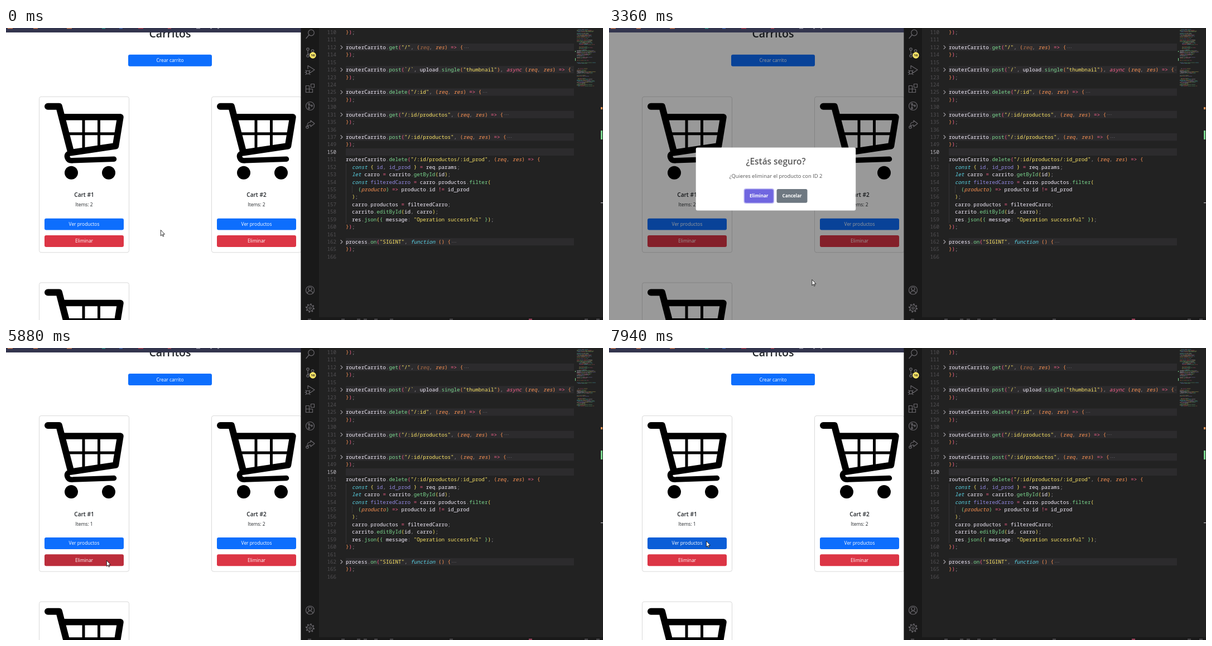
An HTML page for the animation above (8 s loop, 1070 px wide and 524 px high).

```html
<!DOCTYPE html>
<html lang="es">
<head>
<meta charset="utf-8">
<title>Carritos</title>
<style>
html, body { margin: 0; height: 100%; overflow: hidden; background: #222; }
svg { display: block; width: 100vw; height: 100vh; font-family: "Open Sans", "Noto Sans", sans-serif; }
text { white-space: pre; }
.mono { font-family: "Noto Sans Mono", "DejaVu Sans Mono", monospace; font-size: 9.23px; font-weight: 500; }
.icon { fill: none; stroke: #69676c; stroke-width: 1.2; stroke-linejoin: round; stroke-linecap: round; }
.loading .pic { display: none; }
.loading .body, .loading .lower { transform: translateY(-142px); }
.loading .frame { height: 138px; }
</style>
</head>
<body>
<svg id="stage" viewBox="0 0 1070 524" preserveAspectRatio="none"></svg>
<script>
const PINK = '#fc618d', ORANGE = '#fd9353', YELLOW = '#fce566', GREEN = '#7bd88f',
      BLUE = '#5ad4e6', PURPLE = '#948ae3', WHITE = '#f7f1ff', GRAY = '#8b888f';
const BRACKETS = [PINK, ORANGE, YELLOW, GREEN, BLUE, PURPLE];

const rect = (x, y, w, h, fill, extra = '') =>
  `<rect x="${x}" y="${y}" width="${w}" height="${h}" fill="${fill}" ${extra}/>`;
const label = (x, y, size, str, fill, weight = 400, extra = '') =>
  `<text x="${x}" y="${y + size * 0.36}" font-size="${size}" fill="${fill}" font-weight="${weight}" text-anchor="middle" ${extra}>${str}</text>`;
const button = (x, y, w, h, fill, str, size = 8.4, weight = 400, extra = '') =>
  rect(x, y, w, h, fill, `rx="3" ${extra}`) + label(x + w / 2, y + h / 2, size, str, '#fff', weight);

// ---- Shop page ----
const cartIcon = `<g class="pic" fill="none" stroke="#000" stroke-linecap="round" stroke-linejoin="round">
  <path d="M16 18H36L57 99" stroke-width="12"/>
  <path d="M42 37H146L137.500 89 57 101" stroke-width="11.500"/>
  <path d="M56 101Q49 104 51 110 53 116 61 115L134.500 112.500" stroke-width="9.500"/>
  <path d="M80 38V96M107.500 38V94M47 67H140" stroke-width="5"/>
  <g fill="#000" stroke="none"><circle cx="58" cy="137" r="12"/><circle cx="125" cy="137" r="12"/></g></g>`;

const card = (x, y, n, cls = '') => `<g transform="translate(${x} ${y})"><g class="${cls}">
  <rect class="frame" x=".5" y=".5" width="161" height="279.500" rx="3.500" fill="#fff" stroke="#d9d9d9"/>
  ${cartIcon}<g class="body">
  ${label(81, 177, 10.1, 'Cart #' + n, '#212529', 600)}
  ${label(81, 194.5, 8.4, 'Items: 2', '#212529', 400, `id="items${n}"`)}
  ${button(10, 218.9, 142, 20.9, '#0d6efd', 'Ver productos', 8.4, 400, `id="view${n}"`)}
  ${button(10, 249.2, 142, 20.9, '#dc3545', 'Eliminar', 8.4, 400, `id="remove${n}"`)}
  </g></g></g>`;

const bookmarks = [[3, 9, ORANGE], [49, 8, ORANGE], [109, 9, ORANGE], [172, 6, '#2fb59a'], [203, 6, '#4d7fd6'],
  [237, 9, '#d33b4a'], [290, 6, '#e0525c'], [341, 7, '#b9bac8'], [366, 3, '#b9bac8'], [379, 3, '#b9bac8']]
  .map(([x, w, c]) => rect(x, 0, w, 1.3, c, 'opacity=".8"')).join('');

const page = `<g id="page">
  ${label(294, 10, 19.5, 'Carritos', '#212529', 600)}
  ${button(219, 47.8, 150, 20.9, '#0d6efd', 'Crear carrito')}
  ${card(59, 122.8, 1)}${card(368, 122.8, 2)}${card(59, 456.5, 3, 'lower')}</g>`;

// ---- Dialogs, laid out around their shared centre (299, 271) ----
const columns = [139.5, 203, 267, 330.5, 394.5, 458];
const cells = [139, 201.5, 264.5, 327.5, 390];
const cross = (x, y) => [['#000', 6.4], ['#fff', 3.6]].map(([c, w]) =>
  `<path d="M${x - 6.7} ${y - 6.7}l13.400 13.400m0-13.400l-13.400 13.400" stroke="${c}" stroke-width="${w}" stroke-linecap="round"/>`).join('');
const productRow = (y, values) => rect(103, y, 391, 31.5, '#f8f9fa') +
  values.map((v, i) => label(cells[i], y + 12, 9.5, v, '#545454')).join('') + cross(455.5, y + 16);
const ringed = (x, y, w, h, str) =>
  rect(x - 1.6, y - 1.6, w + 3.2, h + 3.2, '#b8b3f0', 'rx="4"') + button(x, y, w, h, '#7066e0', str, 8, 700);

const dialogs = `
  <g id="products">${rect(87, 165, 424, 212, '#fff', 'rx="3"')}
    <path d="M493.500 176.500l7.500 7.500m0-7.500l-7.500 7.500" stroke="#bbb" stroke-width="1.700"/>
    ${label(299, 189, 15.4, 'Productos', '#595959', 600)}
    ${rect(103, 213, 391, 32, '#f8f9fa')}
    ${['Nombre', 'Código', 'Precio', 'Cantidad', 'ID', 'Eliminar'].map((s, i) => label(columns[i], 225, 9.4, s, '#545454', 700)).join('')}
    ${productRow(249, ['Aceite', 'AcNa1', 500, 15, 2])}${productRow(284.5, ['Leche', 'LeSe1', 200, 10, 1])}
    ${ringed(277, 338.7, 44, 24, 'Cerrar')}</g>
  <g id="confirm">${rect(155.7, 214.5, 286.5, 113, '#fff', 'rx="3"')}
    ${label(299, 239, 15.4, '¿Estás seguro?', '#595959', 600)}
    ${label(299, 265.3, 9.4, '', '#545454', 400, 'id="question"')}
    ${ringed(243, 289.5, 51.5, 24, 'Eliminar')}
    ${button(300.5, 289, 55, 24.8, '#6e7881', 'Cancelar', 8, 700)}</g>`;

// ---- Code editor ----
const code = `110|});
111|
112|>routerCarrito.get("/", (req, res) => {
114|});
115|
116|>routerCarrito.post(\`/\`, upload.single("thumbnail"), async (req, res) => {
123|});
124|
125|>routerCarrito.delete("/:id", (req, res) => {
129|});
130|
131|>routerCarrito.get("/:id/productos", (req, res) => {
135|});
136|
137|>routerCarrito.post("/:id/productos", (req, res) => {
149|});
150|
151|routerCarrito.delete("/:id/productos/:id_prod", (req, res) => {
152|  const { id, id_prod } = req.params;
153|  let carro = carrito.getById(id);
154|  const filteredCarro = carro.productos.filter(
155|    (producto) => producto.id != id_prod
156|  );
157|  carro.productos = filteredCarro;
158|  carrito.editById(id, carro);
159|  res.json({ message: "Operation successful" });
160|});
161|
162|>process.on("SIGINT", function () {
165|});
166|`.split('\n');

const rules = [
  [/^(["`]).*?\1/, YELLOW],
  [/^(const|let|function)\b/, BLUE, true],
  [/^async\b/, PINK, true],
  [/^((req|res)(?=[,)])|producto(?=\)))/, ORANGE, true],
  [/^(id(?=, id_)|id_prod(?= })|filteredCarro(?= =))/, PURPLE],
  [/^(=>|!=|=)/, PINK],
  [/^(get|post|delete|single|getById|filter|editById|json|on)(?=\()/, GREEN],
  [/^[.,;:]/, GRAY],
  [/^\w+/, WHITE],
  [/^\s+/, WHITE]];

let depth = 2;
function highlight(line, dimFirstParam) {
  let out = '';
  while (line) {
    let piece = line[0], color, italic = false;
    if ('({'.includes(piece)) color = BRACKETS[depth++];
    else if (')}'.includes(piece)) color = BRACKETS[--depth];
    else {
      const rule = rules.find(([pattern]) => pattern.test(line));
      piece = line.match(rule[0])[0];
      [, color, italic] = rule;
    }
    const dim = dimFirstParam && piece === 'req' ? ' fill-opacity=".6"' : '';
    out += `<tspan fill="${color}"${italic ? ' font-style="italic"' : ''}${dim}>${piece}</tspan>`;
    line = line.slice(piece.length);
  }
  return out;
}

const codeRows = code.map((entry, i) => {
  const [number, source] = entry.split(/\|(.*)/);
  const y = 7.7 + 13.43 * i, folded = source.startsWith('>'), current = number === '150';
  const dots = folded ? `<tspan dx="1.500" dy="-1.300" font-size="5" font-weight="700" fill="${GRAY}">···</tspan>` : '';
  return (folded || current ? rect(609, y - 6.7, 409, 13.2, '#2c2b2d') : '') +
    (folded ? `<path class="icon" d="M600 ${y - 3}l3 3-3 3" style="stroke:#a09da3"/>` : '') +
    `<text class="mono" x="592" y="${y + 3.3}" text-anchor="end" fill="${current ? '#c1bec5' : '#525053'}">${number}</text>` +
    `<text class="mono" x="609" y="${y + 3.3}">${highlight(source.replace(/^>/, ''), number === '112')}${dots}</text>`;
}).join('');

let seed = 7;
const random = () => (seed = seed * 16807 % 2147483647) / 2147483647;
let minimap = '';
for (let y = 1; y < 106; y += 1.35) {
  const sparse = y > 53 && y < 90;
  if (random() < (sparse ? 0.55 : 0.12)) continue;
  let x = 1023 + (y > 24 && y < 40 ? 4 : 0) + (random() < 0.3 ? 2 : 0);
  for (let n = 2 + random() * 3; n > 0; n--) {
    const w = 2 + random() * 6;
    minimap += rect(x, y, w, 0.8, BRACKETS.concat(WHITE, GREEN)[Math.floor(random() * 8)], 'opacity=".4"');
    x += w + 0.7;
  }
}

const icons = `<g class="icon">
  <circle cx="547" cy="8.500" r="5.300"/><path d="M543 12.500l-5 6"/>
  <circle cx="541" cy="38" r="2.200"/><circle cx="541" cy="50" r="2.200"/><circle cx="549.500" cy="41" r="2.200"/><path d="M541 40.500v7M549.500 43.500q0 3-8 3"/>
  <path d="M541 73v-5.500l12 7.500-8 5.500"/><circle cx="541" cy="79.500" r="3"/><path d="M537 76l2 1.500m-3 2h2m-1 4l2-1.500m6-6l-2 1.500m3 2h-2m1 4l-2-1.500"/>
  <path d="M537.500 103.500h6v12h-6zM537.500 109.500h12v6h-12M546.500 100.500h6v6h-6z"/>
  <circle cx="545" cy="140" r="7.500"/><circle cx="543" cy="136.500" r="1.300"/><circle cx="543" cy="144" r="1.300"/><circle cx="548" cy="139.500" r="1.300"/><path d="M543 138v5m0-5.500l4 1.500"/>
  <path d="M546 166l7 5.500-7 5.500v-3q-5 0-6 3-1-8 6-8z"/><circle cx="540" cy="178" r="2.200"/>
  <circle cx="545" cy="470.500" r="7.500"/><circle cx="545" cy="468" r="3"/><path d="M540 476q1-4 5-4t5 4"/>
  <circle cx="545" cy="502.500" r="5.500"/><circle cx="545" cy="502.500" r="2"/><circle cx="545" cy="502.500" r="7" stroke-width="2" stroke-dasharray="2.500 3" stroke-linecap="butt"/></g>
  <circle cx="550" cy="49" r="5.700" fill="${YELLOW}"/>${label(550, 49, 6, '16', '#222', 700)}`;

const statusMarks = [541, 601, 629, 641, 660, 688, 795, 937, 1037, 1058]
  .map(x => rect(x, 522, 6, 1.2, x === 937 ? PINK : '#69676c')).join('');

const editor = rect(528.6, 0, 542, 524, '#222') + rect(528.6, 0, 32.4, 524, '#191919') + icons +
  codeRows + '<path d="M609.500 243V350M620.500 283v13" stroke="#3a393b" stroke-width=".8"/>' +
  rect(1018, 0, 52, 519, '#222') + minimap +
  rect(1020, 41, 1, 2, GREEN) + rect(1020, 54, 1, 5, GREEN) +
  rect(1066, 142, 3, 4, ORANGE) + rect(1066, 184, 3, 16, GREEN) + rect(1066, 313, 4, 1.2, '#c1bec5') +
  rect(529, 519, 541, 5, '#191919') + statusMarks;

const stage = document.getElementById('stage');
stage.innerHTML = `<clipPath id="browser"><path d="M0 0H529V524H0z"/></clipPath>
  <g clip-path="url(#browser)">${rect(0, 0, 529, 524, '#fff')}${page}
  ${rect(0, 8, 529, 516, '#000', 'id="shade"')}${rect(0, 0, 529, 8, '#33354e')}${bookmarks}${dialogs}</g>${editor}
  <g id="cursor" fill="#fff" stroke="#000" stroke-width=".8" stroke-linejoin="round">
  <path id="arrow" d="M.4.500V11L2.800 8.700 4.300 12.200 5.800 11.500 4.300 8.100H7.500Z"/>
  <path id="hand" d="M3 8V1.600Q3 .5 4 .5T5 1.600V5.500Q9.500 5.500 9.500 8V10Q9.300 12 8.300 13H4.300Q3.500 11.500.8 8.600.8 7 3 8Z"/></g>`;

// ---- Motion ----
const $ = id => document.getElementById(id);
const el = Object.fromEntries(['page', 'shade', 'products', 'confirm', 'question', 'cursor', 'arrow', 'hand', 'items1', 'view1', 'remove1'].map(id => [id, $(id)]));
const OPEN = 820, ASK_PRODUCT = 2940, ACCEPT = 4060, RELOAD = 4430, LOADED = 4770, ASK_CART = 5900, CANCEL = 7310;

const ramp = (t, start, length) => Math.min(1, Math.max(0, (t - start) / length));
const ease = p => 1 - (1 - p) ** 2.2;
const mix = (a, b, p) => a + (b - a) * p;
const pulse = (t, from, to, fade) => ease(ramp(t, from, fade)) * (1 - ease(ramp(t, to, fade)));
const within = (t, spans) => spans.some(([a, b]) => t >= a && t < b);
const blend = (a, b, p) => `rgb(${a.map((v, i) => Math.round(mix(v, b[i], p)))})`;

// time, x, y
const path = [[0, 277, 362], [300, 277, 362], [660, 204, 351], [1030, 204, 351], [1270, 358, 410],
  [1990, 358, 410], [2600, 431.5, 263], [2740, 453, 262], [2820, 455, 267], [2950, 455, 267],
  [3350, 363.5, 451], [3580, 363.5, 451], [3930, 270, 301], [4100, 270, 301], [4370, 297, 427],
  [5280, 297, 427], [5640, 172, 378], [5850, 172, 378], [6080, 332, 435], [6920, 332, 435],
  [7220, 336, 296], [7340, 336, 296], [7710, 180, 344], [7780, 180, 344], [7940, 174, 346], [8000, 174, 346]];

function cursorAt(t) {
  const i = path.findIndex(p => p[0] > t);
  const [t0, x0, y0] = path[i - 1], [t1, x1, y1] = path[i];
  const p = ramp(t, t0, t1 - t0), s = p * p * (3 - 2 * p);
  return [mix(x0, x1, s), mix(y0, y1, s)];
}

// Pops in with an overshoot, shrinks away on closing.
function popScale(age) {
  const p = ramp(age, 0, 300);
  if (p < 0.45) return mix(0.7, 1.05, ease(p / 0.45));
  if (p < 0.8) return mix(1.05, 0.95, ease((p - 0.45) / 0.35));
  return mix(0.95, 1, ease((p - 0.8) / 0.2));
}
function pose(node, t, open, close, fade = 150) {
  const gone = fade ? ease(ramp(t, close, fade)) : 0;
  node.style.display = t >= open && t < close + fade ? '' : 'none';
  node.setAttribute('opacity', 1 - gone);
  node.setAttribute('transform', `translate(299 271) scale(${popScale(t - open) * (1 - gone / 2)}) translate(-299 -271)`);
}

function draw(t) {
  const reloaded = t >= RELOAD, second = t >= LOADED;
  stage.classList.toggle('loading', reloaded && !second);
  el.page.setAttribute('transform', `translate(0 ${reloaded ? -1.7 : 0})`);
  el.items1.textContent = 'Items: ' + (reloaded ? 1 : 2);
  el.view1.setAttribute('fill', blend([13, 110, 253], [11, 94, 215], pulse(t, 480, OPEN, 150) + pulse(t, 7600, 9000, 150)));
  el.remove1.setAttribute('fill', blend([220, 53, 69], [187, 45, 59], pulse(t, 5500, ASK_CART, 150)));

  el.shade.setAttribute('opacity', 0.4 * (pulse(t, OPEN, ACCEPT, 100) + pulse(t, ASK_CART, CANCEL, 100)));
  pose(el.products, t, OPEN, ASK_PRODUCT, 0);
  if (second) pose(el.confirm, t, ASK_CART, CANCEL); else pose(el.confirm, t, ASK_PRODUCT, ACCEPT);
  el.question.textContent = second ? '¿Quieres eliminar el carrito con ID 1' : '¿Quieres eliminar el producto con ID 2';

  const [x, y] = cursorAt(t), pointing = within(t, [[2560, ASK_PRODUCT], [3870, 4080], [7160, 7330]]);
  el.cursor.setAttribute('transform', `translate(${x} ${y})`);
  el.arrow.style.display = pointing ? 'none' : '';
  el.hand.style.display = pointing ? '' : 'none';
}

const start = performance.now();
function tick() {
  draw((performance.now() - start) % 8000);
  requestAnimationFrame(tick);
}
tick();
</script>
</body>
</html>
```
